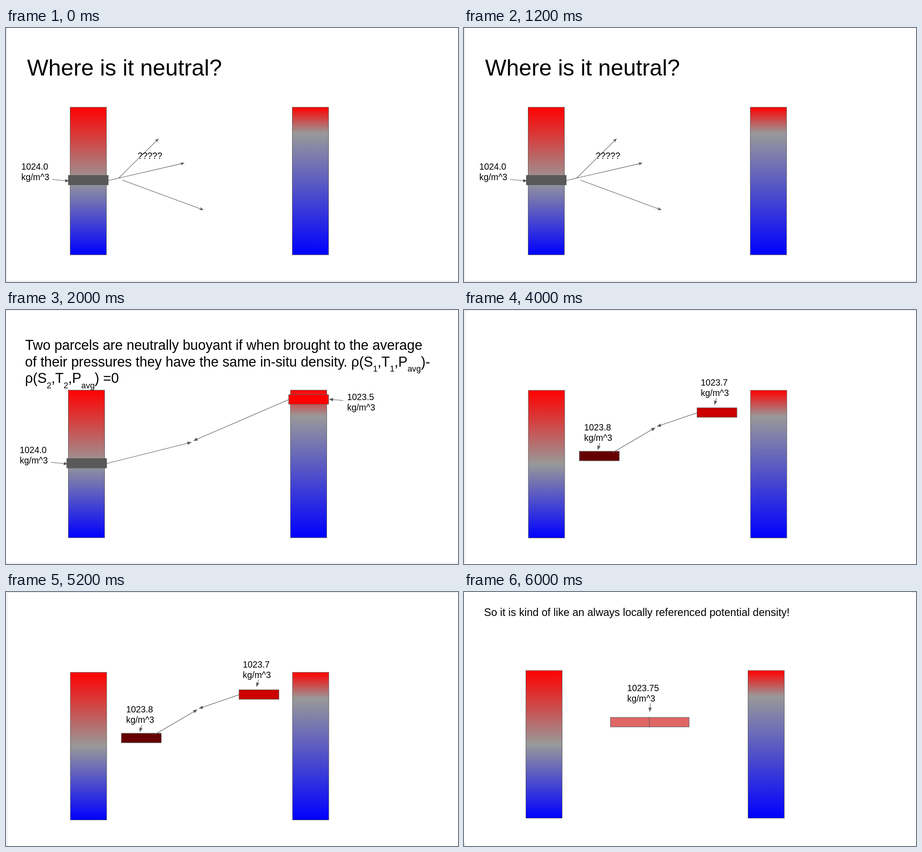
Recreate the animation shown at these times as an HTML page. Size 997 by 561 pixels, loop 8 s.

```html
<!DOCTYPE html>
<html lang="en">
<head>
<meta charset="utf-8">
<title>Where is it neutral?</title>
<style>
  html, body { margin: 0; width: 100%; height: 100%; overflow: hidden; background: #fff; }
  svg { display: block; width: 997px; height: 561px; }
  text { font-family: "Liberation Sans", Arial, sans-serif; fill: #000; white-space: pre; }
</style>
</head>
<body>
<svg id="stage" viewBox="0 0 997 561">
  <defs>
    <linearGradient id="deep" x2="0" y2="1">
      <stop stop-color="#f00"/><stop offset=".5" stop-color="#999"/><stop offset="1" stop-color="#00f"/>
    </linearGradient>
    <linearGradient id="shallow" x2="0" y2="1">
      <stop stop-color="#f00"/><stop offset=".175" stop-color="#999"/><stop offset="1" stop-color="#00f"/>
    </linearGradient>
  </defs>
</svg>
<script>
const HOLD = 2000;
const PT = 1.386; // stage pixels per point of type
const INK = '#595959';

const text = (x, y, pt, body) =>
  `<text x="${x}" y="${y}" font-size="${pt * PT}">${body}</text>`;

const label = (x, y, value) =>
  text(x, y, 14, value) + text(x, y + 23, 14, 'kg/m^3');

const box = (x, y, w, h, fill) =>
  `<rect x="${x}" y="${y}" width="${w}" height="${h}" fill="${fill}" stroke="${INK}"/>`;

const parcel = (x, y, fill) => box(x, y, 88, 21, fill);

const columns = (x, y) =>
  box(x, y, 80, 326, 'url(#deep)') + box(x + 490, y, 80, 326, 'url(#shallow)');

const edge = (x, y, w, h) =>
  `<rect x="${x}" y="${y}" width="${w}" height="${h}" fill="#e2e2e2"/>`;

// Straight arrow; notch > 0 gives a swept-back head.
function arrow(x1, y1, x2, y2, notch = 0) {
  const len = Math.hypot(x2 - x1, y2 - y1);
  const turn = Math.atan2(y2 - y1, x2 - x1) * 180 / Math.PI;
  return `<g transform="translate(${x1} ${y1}) rotate(${turn})" fill="${INK}">
    <path d="M0 0H${len - 6}" stroke="${INK}" stroke-width="1.1"/>
    <path d="M${len} 0l-9.5 -3.6l${notch} 3.6l${-notch} 3.6z"/></g>`;
}

// Marks up _x as a subscript and returns to the baseline afterwards.
function formula(x, y, pt, body) {
  let low = false;
  const spans = body.split(/_(\w+?)(?=[,)])/).map((part, i) => {
    const sub = i % 2 === 1;
    const dy = sub === low ? 0 : sub ? 11.5 : -11.5;
    low = sub;
    return `<tspan dy="${dy}" font-size="${(sub ? 0.6 : 1) * pt * PT}">${part}</tspan>`;
  });
  return text(x, y, pt, spans.join(''));
}

const scenes = [
  edge(0.5, 0, 1.5, 560) + edge(0.5, 558.5, 996.5, 1.8) +
  text(46.5, 105, 36, 'Where is it neutral?') +
  columns(141.5, 175) +
  arrow(102, 334.5, 140, 338) +
  arrow(225, 337, 394, 298, 3) +
  arrow(249, 331, 337, 244, 3) +
  arrow(257, 336, 436, 402, 3) +
  parcel(137.5, 325.5, INK) +
  label(33.7, 313, '1024.0') +
  text(290.5, 288.5, 14, '?????'),

  edge(0, 0, 990, 1) + edge(0, 558.5, 997, 1.8) +
  columns(137.5, 177) +
  text(42.3, 88, 22, 'Two parcels are neutrally buoyant if when brought to the average') +
  formula(42, 124.5, 22, 'of their pressures they have the same in-situ density. ρ(S_1,T_1,P_avg)-') +
  formula(42, 161, 22, 'ρ(S_2,T_2,P_avg) =0') +
  arrow(99, 336.5, 137, 340) +
  parcel(134, 328, INK) + parcel(623.5, 187, '#f00') +
  arrow(222, 339, 409.5, 292) +
  arrow(623.5, 198, 413, 289) +
  arrow(744, 200, 712, 197) +
  label(30.3, 315.5, '1024.0') + label(752.5, 199, '1023.5'),

  edge(1.5, 0.5, 1.5, 560.5) + edge(1.5, 0, 995.5, 1.2) +
  columns(142, 177.5) +
  parcel(254.5, 312, '#600') + parcel(514, 216, '#c00') +
  arrow(299.5, 294, 295, 309.5) +
  arrow(557, 194, 552.5, 210) +
  arrow(327, 315.5, 422.5, 259.5) +
  arrow(514, 227, 425, 257.5) +
  label(265, 266, '1023.8') + label(522.3, 166.5, '1023.7'),

  edge(987, 0, 10, 1.2) + edge(0.5, 554, 2.5, 7) +
  text(44.2, 52.5, 17, 'So it is kind of like an always locally referenced potential density!') +
  columns(136.5, 173.5) +
  parcel(323, 277, '#e06666') + parcel(408.5, 277, '#e06666') +
  arrow(411, 246, 409.8, 265) +
  label(360, 218.5, '1023.75')
];

const stage = document.getElementById('stage');
stage.insertAdjacentHTML('beforeend', scenes.map(s => `<g visibility="hidden">${s}</g>`).join(''));
const groups = [...stage.children].slice(1);

function draw(now) {
  const current = Math.floor(now / HOLD) % groups.length;
  groups.forEach((g, i) => g.setAttribute('visibility', i === current ? 'visible' : 'hidden'));
}

const start = performance.now();
function tick() {
  draw(performance.now() - start);
  requestAnimationFrame(tick);
}
tick();
</script>
</body>
</html>
```
